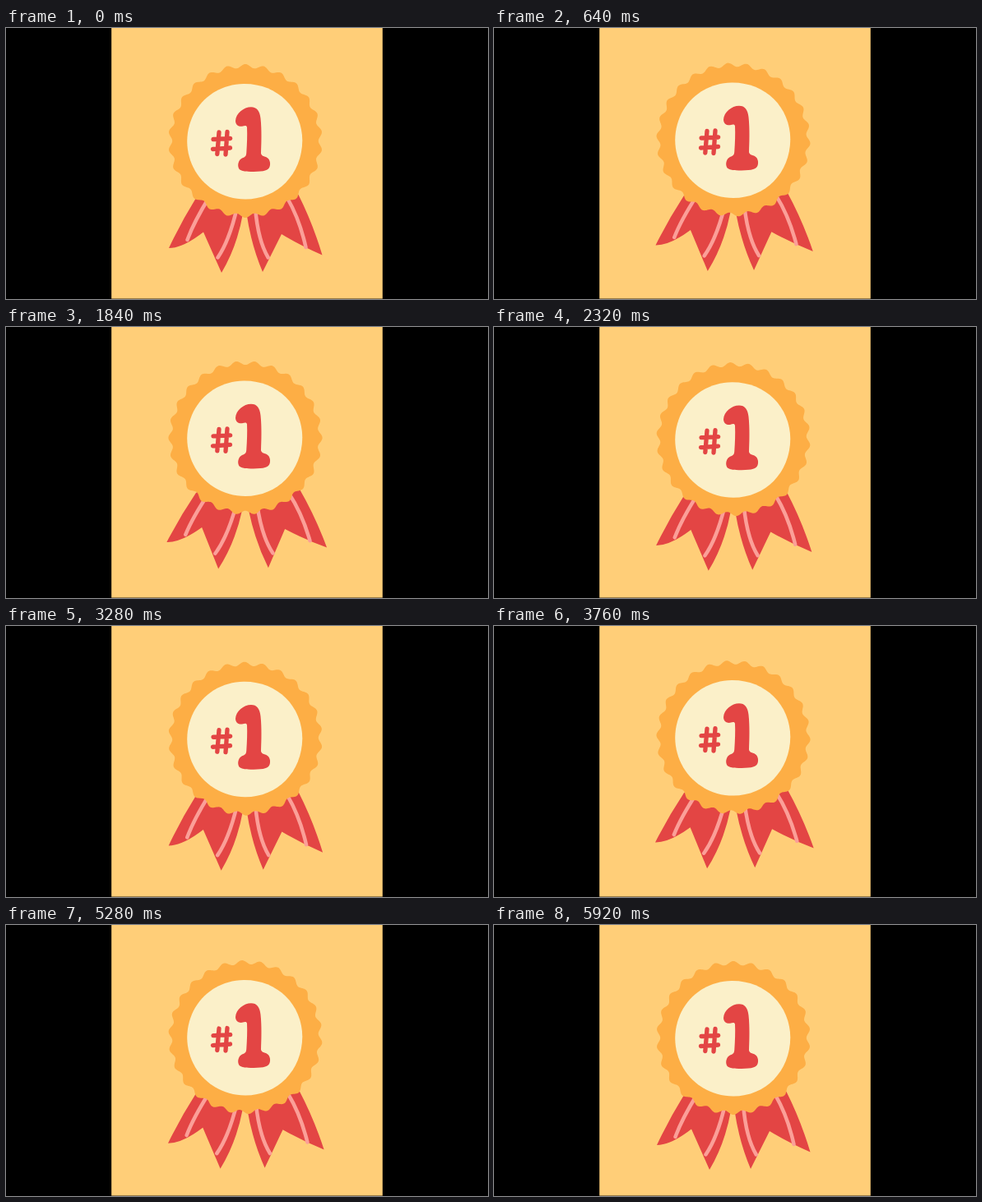
These frames come from a looping animation (586 px wide and 330 px high, 6000 ms). An HTML page:

```html
<!DOCTYPE html>
<html lang="en">
<head>
<meta charset="utf-8">
<title>Number one rosette</title>
<style>
  html, body { margin: 0; width: 100%; height: 100%; overflow: hidden; background: #000; }
  svg { display: block; width: 586px; height: 330px; }
  .red { fill: #e34544; }
  .stripe { fill: none; stroke: #fb9f98; stroke-width: 4.5; stroke-linecap: round; }
  .hash { fill: none; stroke: #e34544; stroke-width: 5.3; stroke-linecap: round; }
</style>
</head>
<body>
<svg viewBox="0 0 586 330">
  <rect x="128.2" width="329.6" height="329.6" fill="#ffce78"/>
  <g id="badge">
    <g id="left">
      <path class="red" d="M231 207Q213 236 198 268Q215 268 240 248.500L262 298Q281 266 288 226L265 180Z"/>
      <path class="stripe" d="M247 206Q228 237 220.500 258M281 218Q272 258 257.500 279.500"/>
    </g>
    <g id="right">
      <path class="red" d="M292.500 226Q298 264 312 297L335 251Q358 265 384.500 276.500Q373 238 355.500 203L315 180Z"/>
      <path class="stripe" d="M303 218Q306 258 318.700 279.500M342 207Q357 233 364.500 267"/>
    </g>
    <path id="rim" fill="#fdae45"/>
    <path fill="#fbf0c9" d="M289 68C330 67.500 360 98 360.300 137C360 178 330 208.500 291 208.500C251 208.500 220.500 177 220.200 138C220.500 99 250 68.500 289 68Z"/>
    <path class="hash" d="M259 127L256.800 153.500M269 126.500L267 154M252 135.500L272.700 134.500M251.500 147.500L272.500 146"/>
    <path class="red" d="M279 113C279.500 104 289 96.300 298 96.300C305 96.300 308.500 101 309.500 110C311 124 310.500 140 310 152C310 155.500 313 156 316 157C320.500 159 322 164 320.500 169C319 173.500 314 174.800 301 175C291 175 285 174.500 283 171C281 166 283 160.500 287 158.500C291 157 292 156 292.300 152C293 141 293.500 131 293 121C292.500 118 290 119 287 119.800C283 120.300 279 118 279 113Z"/>
  </g>
</svg>
<script>
const STEP = 80, LOOP = 6000, HALF = 1500;
const CX = 291, CY = 137.5;

const $ = id => document.getElementById(id);
const move = (id, value) => $(id).setAttribute("transform", value);

function rimPath(bumps, radius, depth) {
  const pts = [];
  for (let i = 0; i < 520; i++) {
    const a = i * Math.PI / 260;
    const r = radius + depth * Math.cos(bumps * (a + Math.PI / 2));
    pts.push((CX + r * Math.cos(a)).toFixed(2) + " " + (CY + r * Math.sin(a)).toFixed(2));
  }
  return "M" + pts.join("L") + "Z";
}
$("rim").setAttribute("d", rimPath(26, 91.2, 2.4));

// Cubic bezier (.4, 0, .4, 1), solved by bisection
function ease(x) {
  let lo = 0, hi = 1, s = 0.5;
  for (let i = 0; i < 24; i++) {
    s = (lo + hi) / 2;
    if (1.2 * s * (1 - s) + s * s * s < x) lo = s; else hi = s;
  }
  return s * s * (3 - 2 * s);
}

// 0 at rest, 1 when the ribbons are fully spread
function spreadAt(t) {
  const u = (t / HALF) % 2;
  return u < 1 ? ease(u) : 1 - ease(u - 1);
}

function draw(t) {
  const p = spreadAt(t);
  move("badge", `translate(0 ${-3 * p})`);
  move("rim", `rotate(${-8 * p} ${CX} ${CY})`);
  move("left", `rotate(${2.6 * p} 285 200)`);
  move("right", `rotate(${-4 * p} 298 182)`);
}

const start = performance.now();
function tick() {
  const t = (performance.now() - start) % LOOP;
  draw(Math.floor(t / STEP) * STEP);
  requestAnimationFrame(tick);
}
draw(0);
requestAnimationFrame(tick);
</script>
</body>
</html>
```
